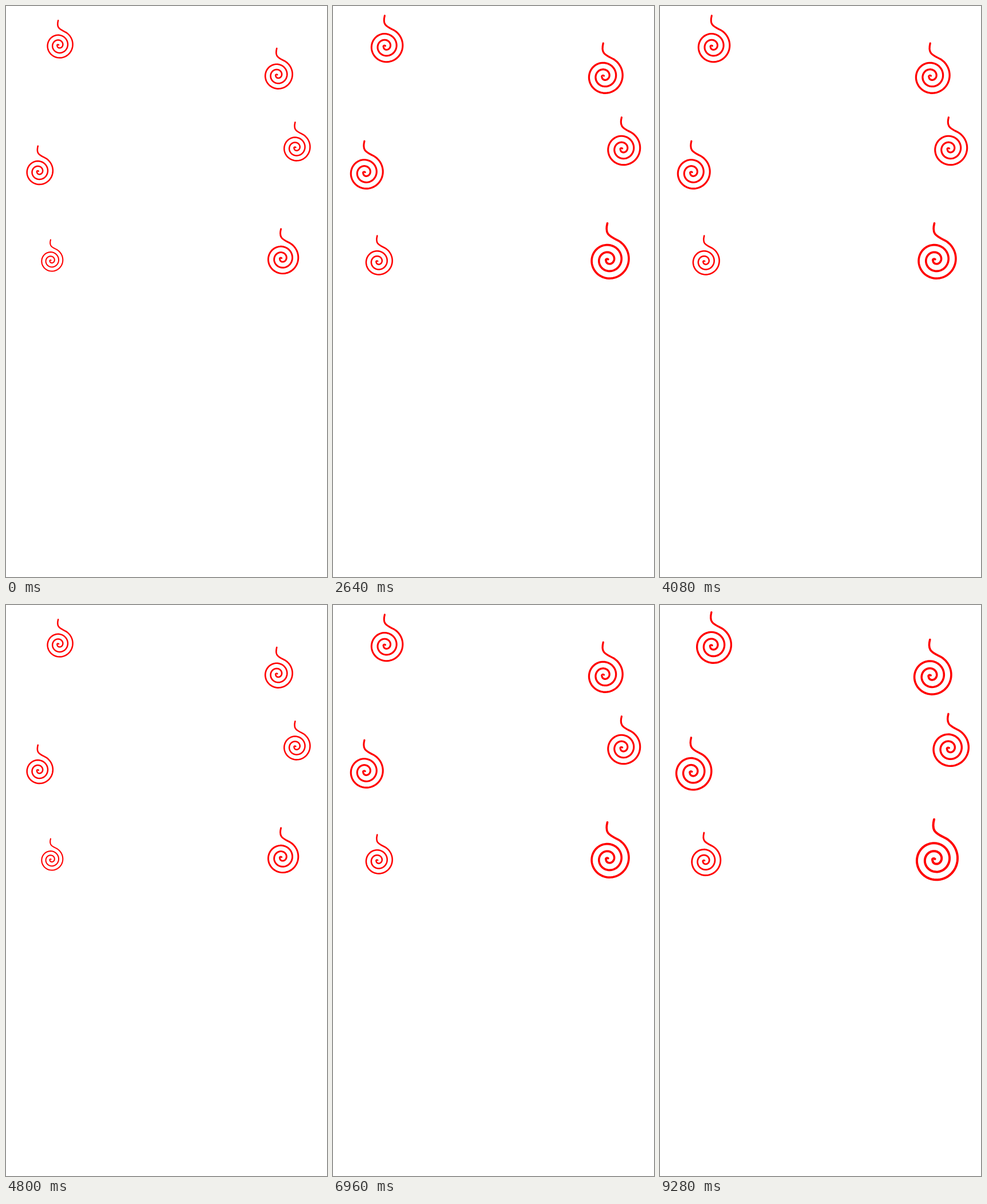
An HTML page that plays this animation: 561 by 998 pixels, repeating every 9.36 s.

```html
<!DOCTYPE html>
<html lang="en">
<head>
<meta charset="utf-8">
<title>Pulsing spirals</title>
<style>
html, body { margin: 0; width: 100%; height: 100%; overflow: hidden; background: #fff; }
svg { display: block; width: 561px; height: 998px; }
path { fill: none; stroke: #f00; stroke-width: 4; stroke-linecap: round; stroke-linejoin: round; }
</style>
</head>
<body>
<svg id="stage" viewBox="0 0 561 998"></svg>
<script>
const SVG_NS = 'http://www.w3.org/2000/svg';
const LOOP = 9360, STEP = 80, PERIOD = 480, PEAK = 160;
const PIVOT = { x: 3.8, y: -13 };

// Spiral centre x, y and size at the peak of the pulse.
const SPIRALS = [
  [91.6, 71.4, 0.84],
  [473.6, 123.9, 0.905],
  [505.7, 250.7, 0.862],
  [56.2, 292.2, 0.862],
  [78.3, 447.4, 0.705],
  [481, 444.8, 1]
];

// Stem, then an Archimedean spiral winding inwards to a small hook.
function spiralPath() {
  const points = [];
  for (let deg = -62; deg <= 900; deg += 6) {
    const radius = Math.max(39 - 14 * deg / 360, 5);
    const a = deg * Math.PI / 180;
    points.push((radius * Math.cos(a)).toFixed(2) + ' ' + (radius * Math.sin(a)).toFixed(2));
  }
  return 'M-2 -70C-4 -62 -4 -54.5 -1 -50C3 -44 11 -41 ' + points.join('L') +
    'C-5 -1.5 -2.5 -2.5 -0.5 -1';
}

function add(parent, name, attrs) {
  const node = document.createElementNS(SVG_NS, name);
  for (const key in attrs) node.setAttribute(key, attrs[key]);
  return parent.appendChild(node);
}

const stage = document.getElementById('stage');
const shape = spiralPath();
const items = SPIRALS.map(([x, y, size]) => {
  const group = add(stage, 'g', {});
  add(group, 'path', { d: shape, transform: `translate(${-PIVOT.x} ${-PIVOT.y})` });
  return { group, size, x: x + PIVOT.x * size, y: y + PIVOT.y * size };
});

function draw(ms) {
  const time = Math.floor((ms % LOOP) / STEP) * STEP;
  const pulse = 0.825 + 0.175 * Math.cos(2 * Math.PI * (time - PEAK) / PERIOD);
  for (const { group, size, x, y } of items) {
    group.setAttribute('transform', `translate(${x} ${y}) scale(${size * pulse})`);
  }
}

const start = performance.now();
function tick() {
  draw(performance.now() - start);
  requestAnimationFrame(tick);
}
tick();
</script>
</body>
</html>
```
